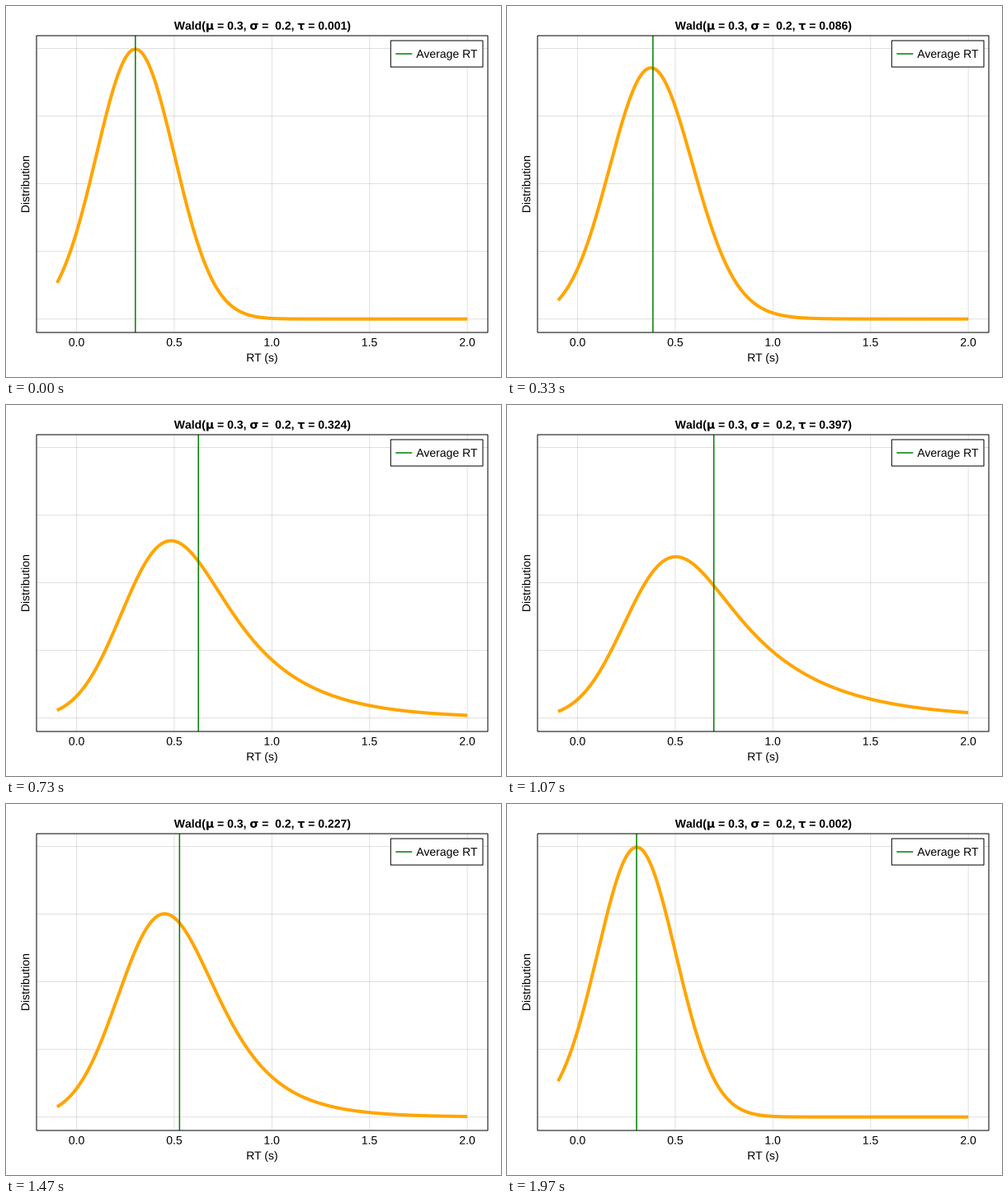
Animation, 600 px wide and 450 px high, one loop 2.01 s. Source, as a matplotlib script:

```python
import math

import matplotlib.pyplot as plt
import numpy as np
from matplotlib.animation import FuncAnimation
from matplotlib.patches import PathPatch, Rectangle
from matplotlib.textpath import TextPath
from matplotlib.transforms import Affine2D

plt.rcParams.update({
    "mathtext.fontset": "custom",
    "mathtext.bf": "DejaVu Sans:bold",
    "path.snap": False,
})

W, H = 600, 450
STEPS, LOOP = 60, 2010
LEFT, TOP, RIGHT, BOTTOM = 37, 36, 584, 396
MU, SIGMA = 0.3, 0.2
TAU_MIN, TAU_MAX = 0.001, 0.4
XS = np.linspace(-0.1, 2.0, 421)


def px(x):
    return LEFT + (x + 0.205) / 2.31 * (RIGHT - LEFT)


def py(y):
    unit = (BOTTOM - TOP) / 1.1 / 1.9947
    return BOTTOM - (BOTTOM - TOP) / 22 - unit * y


def erfcx(z):
    """Scaled complementary error function, safe for large z."""
    if z > 20:
        return (1 - 0.5 / z**2) / (z * math.sqrt(math.pi))
    return math.exp(z * z) * math.erfc(z)


def density(x, tau):
    """Normal plus exponential."""
    d = (x - MU) / SIGMA
    z = (SIGMA / tau - d) / math.sqrt(2)
    return math.exp(-d * d / 2) * erfcx(z) / (2 * tau)


def text_path(s, x, y, align="center", weight="normal", angle=0):
    prop = dict(family="Liberation Sans", weight=weight)
    path = TextPath((0, 0), s, size=14, prop=prop)
    box = path.get_extents()
    shift = -(box.x0 + box.x1) / 2 if align == "center" else 0
    place = Affine2D().translate(shift, 0).scale(1, -1)
    return place.rotate_deg(-angle).translate(x, y).transform_path(path)


def label(*args, **kwargs):
    patch = PathPatch(text_path(*args, **kwargs), fc="black", lw=0)
    return ax.add_patch(patch)


def line(xs, ys, color, width, z):
    return ax.plot(xs, ys, color=color, lw=width, zorder=z,
                   solid_capstyle="butt")[0]


def frame(x0, y0, x1, y1, fill, z):
    ax.add_patch(Rectangle((x0, y0), x1 - x0, y1 - y0, fc=fill, ec="black",
                           lw=1, zorder=z))


def title_path(tau):
    s = (rf"Wald($\mathbf{{μ}}$ = {MU}, $\mathbf{{σ}}$ =  {SIGMA}, "
         rf"$\mathbf{{τ}}$ = {round(tau, 3)})")
    return text_path(s, (LEFT + RIGHT) / 2, 28.7, weight="bold")


# 72 dpi makes one point equal one pixel
fig = plt.figure(figsize=(W / 72, H / 72), dpi=72, facecolor="white")
ax = fig.add_axes([0, 0, 1, 1])
ax.set_xlim(0, W)
ax.set_ylim(H, 0)
ax.axis("off")

for v in np.arange(0, 2.1, 0.5):
    line([px(v)] * 2, [TOP, BOTTOM], (0, 0, 0, 0.12), 1, 1)
    line([LEFT, RIGHT], [py(v)] * 2, (0, 0, 0, 0.12), 1, 1)
    label(f"{v:.1f}", px(v), 412.6)

label("RT (s)", (LEFT + RIGHT) / 2, 431.2)
label("Distribution", 28.2, (TOP + BOTTOM) / 2, angle=90)

curve = line([], [], "orange", 4, 2)
mean = line([], [], "green", 1.5, 3)
title = label("", 0, 0) if False else ax.add_patch(
    PathPatch(title_path(TAU_MIN), fc="black", lw=0))
frame(LEFT, TOP, RIGHT, BOTTOM, "none", 4)

frame(466.3, 42, 578, 74, "white", 5)
line([472.3, 492.3], [58, 58], "green", 1.5, 6)
label("Average RT", 497.3, 62.8, align="left").set_zorder(6)


def update(i):
    swing = (1 - math.cos(2 * math.pi * i / (STEPS - 1))) / 2
    tau = TAU_MIN + (TAU_MAX - TAU_MIN) * swing
    curve.set_data(px(XS), py(np.array([density(x, tau) for x in XS])))
    mean.set_data([px(MU + tau)] * 2, [TOP, BOTTOM])
    title.set_path(title_path(tau))
    return curve, mean, title


anim = FuncAnimation(fig, update, frames=STEPS, interval=LOOP / STEPS,
                     repeat=True, repeat_delay=0)
plt.show()
```
